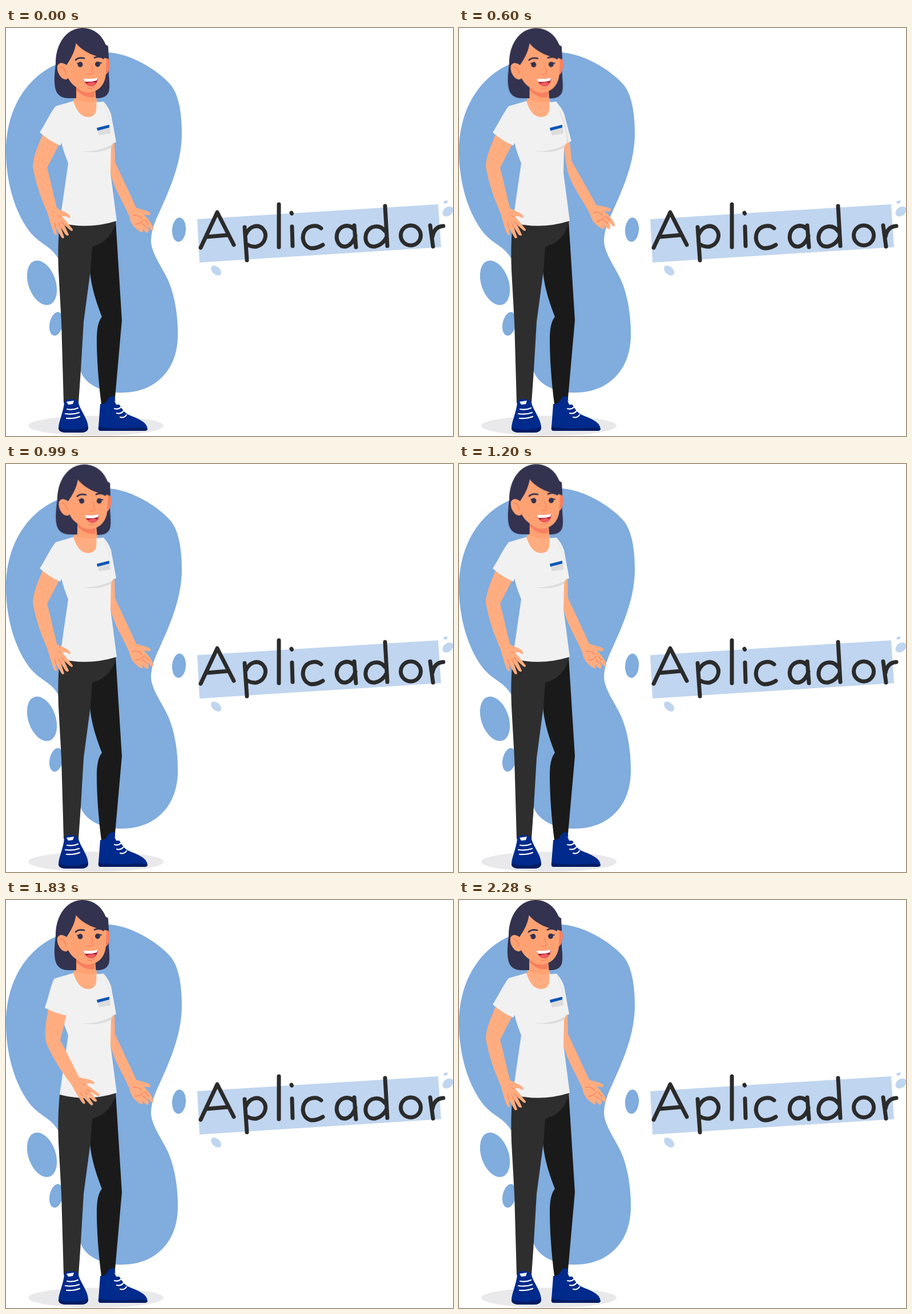
Recreate the animation shown at these times as an HTML page. Size 783x715 px, loop 2.31 s.

```html
<!DOCTYPE html>
<html lang="pt">
<head>
<meta charset="utf-8">
<title>Aplicador</title>
<style>
html, body { margin: 0; width: 100%; height: 100%; overflow: hidden; background: #fff; }
svg { display: block; width: 100vw; height: 100vh; }
.blue { fill: #80acde; }
.pale { fill: #c0d5ef; }
.skin { fill: #ffad80; }
.face { fill: #ffa273; }
.blush { fill: #f6805f; }
.hair { fill: #33324f; }
.shirt { fill: #f1f1f1; }
.fold { fill: #dcdcdc; }
.shoe { fill: #002a8c; }
.sole { fill: #001c63; }
.line { fill: none; stroke-linecap: round; stroke-linejoin: round; }
.ink { stroke: #2b2b2b; stroke-width: 7; }
.crease { stroke: #f6805f; stroke-width: 1.3; }
.brow { stroke: #33324f; stroke-width: 2.8; }
.lash { stroke: #33324f; stroke-width: 1.8; }
.lace { stroke: #fff; stroke-width: 2.2; }
.part { animation: 2310ms linear infinite; }
#armR { transform-origin: 170px 150px; animation-name: offer; }
#armL { transform-origin: 88px 148px; animation-name: swing; }
#head { transform-origin: 142px 125px; animation-name: nod; }
#eyes { transform-origin: 146px 65px; animation-name: blink; }
@keyframes offer {
  0%, 37.4%, 100% { transform: rotate(0deg); }
  18% { transform: rotate(-7.4deg); }
}
@keyframes nod {
  0%, 23.4%, 57.1%, 100% { transform: translate(0, 0) rotate(0deg); }
  36.4% { transform: translate(2.6px, 1.4px) rotate(1.3deg); }
}
@keyframes swing {
  0%, 62.6%, 98.5%, 100% { transform: rotate(0deg); }
  82% { transform: rotate(-15.7deg); }
}
@keyframes blink {
  0%, 3.9%, 11.7%, 100% { transform: scaleY(1); }
  7.8% { transform: scaleY(.12); }
}
</style>
</head>
<body>
<svg viewBox="0 0 783 715" preserveAspectRatio="none">
  <!-- backdrop -->
  <g class="blue">
    <path d="M182 43C222 47 264 73 288 99C303 117 308 150 308 185C308 236 286 284 269 322C260 341 254 357 254 374C255 395 273 418 284 442C296 470 301 503 301 537C301 602 260 639 201 639C163 638 138 622 131 602C124 560 122 450 92 405C80 383 62 380 44 360C17 327 0 272 0 217C0 140 38 85 90 63C120 49 150 42 182 43Z"/>
    <ellipse cx="303" cy="353.5" rx="12" ry="21.3" transform="rotate(4 303 353.5)"/>
    <ellipse cx="63" cy="446.5" rx="24" ry="40.5" transform="rotate(-19 63 446.5)"/>
    <ellipse cx="88" cy="518.5" rx="11.5" ry="21" transform="rotate(12 88 518.5)"/>
  </g>
  <ellipse cx="157.500" cy="697" rx="118.500" ry="17.500" fill="#e9e9eb"/>

  <!-- lettering -->
  <g class="pale">
    <path d="M335 335L757 309L762 384L339 411Z"/>
    <ellipse cx="368" cy="425" rx="10.500" ry="6.800" transform="rotate(42 368 425)"/>
    <ellipse cx="774" cy="321.500" rx="10.500" ry="7.500" transform="rotate(-38 774 321.500)"/>
    <ellipse cx="770" cy="305" rx="3.800" ry="2.400" transform="rotate(-25 770 305)"/>
  </g>
  <g class="line ink" role="img" aria-label="Aplicador">
    <path d="M341 385L370 323L399 380M352 366L387 363"/>
    <path d="M418 349L422 407M420 362C426 347 441 343 450 352C459 362 454 379 439 383Q429 384 422 379"/>
    <path d="M478 309L478 384"/>
    <path d="M501 348L502 382M500 324L500.500 325"/>
    <path d="M552 351C543 343 527 347 522 358C517 371 523 384 535 386Q546 386 555 380"/>
    <path d="M609 352C599 342 584 347 580 360C577 373 584 384 595 383Q607 380 612 364M610 346L613 384"/>
    <path d="M664 356C655 343 637 346 631 360C627 374 634 384 646 383Q660 380 667 366M664 312L668 382"/>
    <ellipse cx="709" cy="363.500" rx="17.500" ry="17.500"/>
    <path d="M743 346L748 383M747 366Q750 348 766 347"/>
  </g>

  <!-- legs -->
  <path fill="#1a1a1a" d="M192 337L203 512L191 648V659H167C162 620 159 580 159 547C159 525 162 514 168 506C160 485 149 455 147 425L149 370Z"/>
  <path fill="#2e2e2e" d="M94 340C91 375 91 400 92 425L97 515L101 657H127L131 600L136 515L148 425L151 383C172 378 189 362 193 337Z"/>

  <!-- shoes -->
  <path class="shoe" d="M102 656Q104 650 114 650Q125 651 127 656C128 667 144 685 144 700Q144 709 130 709H107Q92 709 92 701C92 690 101 672 102 656Z"/>
  <path class="sole" d="M92 700Q118 708 144 699Q145 709 130 709H107Q91 709 92 700Z"/>
  <path fill="#fff" d="M106 655L119 653L117 659L109 660Z"/>
  <path class="line lace" d="M107 668Q117 670 126 666M104 676Q117 678 128 674M106 684Q119 685 129 681"/>
  <path class="shoe" d="M165 659Q172 659 176 655Q180 645 187 645Q192 646 191 652L194 655C201 661 204 672 213 677C232 685 247 690 248 703Q247 706 242 706H165Q161 705 162 699C163 686 164 674 165 659Z"/>
  <path class="sole" d="M162 699Q200 704 229 700Q245 700 248 703Q247 706 242 706H165Q161 705 162 699Z"/>
  <path fill="#fff" d="M190 653L202 655L199 660L193 660Z"/>
  <path class="line lace" d="M190 667Q197 669 202 664M194 675Q201 677 206 671M200 682Q207 684 211 678"/>

  <!-- far arm -->
  <g id="armR" class="part">
    <path class="skin" d="M178 195L190 199L191 235C202 259 217 290 228 315C237 318 245 319 252 323Q255 327 251 328L241 327C247 332 256 342 258 352Q258 356 254 354L246 345Q252 354 249 358Q246 360 244 357L235 348Q242 355 239 358Q236 359 227 351Q218 343 216 330C206 306 188 280 182 250Z"/>
    <path class="line crease" d="M222 328Q233 327 238 334M227 344Q238 342 240 337M239 343L246 349M243 336L250 344"/>
    <path class="shirt" d="M171 129Q180 139 184 151L193 200L183 204L170 190Z"/>
    <path class="fold" d="M171 129C179 151 187 170 188 202L182 203L170 180Z"/>
  </g>

  <!-- torso -->
  <path class="skin" d="M122 120H157L163 140L150 162L126 155L116 132Z"/>
  <path class="shirt" d="M87 137L118 128C123 143 130 156 144 156C156 156 160 147 158 130L171 129C177 151 187 171 189 194Q189 201 184 208L183 254L194 338Q142 354 94 341L109 237C104 224 99 211 97 199Z"/>
  <path class="fold" d="M133 216Q164 217 186 204L184 210Q162 221 133 216Z"/>
  <path class="fold" d="M160 179L182 174L183 185L163 188Z"/>
  <path fill="#0b55b5" d="M159 175L181 169.500V174.500L160 180Z"/>

  <!-- near arm -->
  <g id="armL" class="part">
    <path class="skin" d="M65 184C57 205 48 222 47 243C52 273 62 300 73 325C76 336 79 347 83 358Q86 365 89 362L87 349L96 365Q99 371 102 367L96 349L104 362Q109 366 110 362L102 345L112 354Q117 358 117 353L104 337L98 330Q106 329 110 333Q114 333 112 329C106 321 96 321 89 315C83 291 78 267 72 245L93 204Z"/>
    <path class="line crease" d="M97 331L92 329M87 349L85 342M96 349L92 342M102 345L97 339"/>
    <path class="shirt" d="M87 137L104 142L108 180L95 206Q76 198 59 183C68 170 77 149 87 137Z"/>
  </g>

  <!-- head -->
  <g id="head" class="part">
    <path class="hair" d="M133 0C105 1 87 28 87 62C85 80 84 92 86 104Q89 122 108 123H162Q180 122 181 106C182 94 179 81 180 70C183 30 166 0 133 0Z"/>
    <path class="face" d="M123 90V125Q140 133 158 128L155 95Z"/>
    <path class="blush" d="M123 102Q134 118 155 111V121Q136 124 123 108Z"/>
    <path class="blush" d="M174 54Q182 51 182 63Q181 79 174 82Z"/>
    <path class="face" d="M106 65Q95 57 90 66Q88 77 97 87Q104 93 109 88C116 102 132 112 148 112C164 111 174 97 175 80L176 50L123 24C121 41 114 53 106 65Z"/>
    <path class="hair" d="M118 22L123 27C134 41 157 52 180 53L179 32L140 6Z"/>
    <path class="line crease" d="M95 68Q104 70 105 81M150 66L153 79Q149 82 145 81M143 105Q149 107 154 104"/>
    <path class="line brow" d="M122 56Q127 51 137 53M155 52Q164 48 171 53"/>
    <g id="eyes" class="part">
      <ellipse class="hair" cx="130" cy="64" rx="4.500" ry="4.700"/>
      <ellipse class="hair" cx="160.500" cy="63.500" rx="4.500" ry="4.700"/>
      <path class="line lash" d="M125 62L131 60.500M160 60L167 61.500"/>
    </g>
    <path fill="#a3122b" d="M135 88.500Q148 90 161 87Q159 102 149 102Q140 101 135 88.500Z"/>
    <path fill="#ee5a5f" d="M140 98Q150 92 158 96Q155 102 149 102Q144 102 140 98Z"/>
    <path fill="#fff" d="M135 88.500Q148 90 161 87L159 92Q149 95 138 94Z"/>
  </g>
</svg>
</body>
</html>
```
